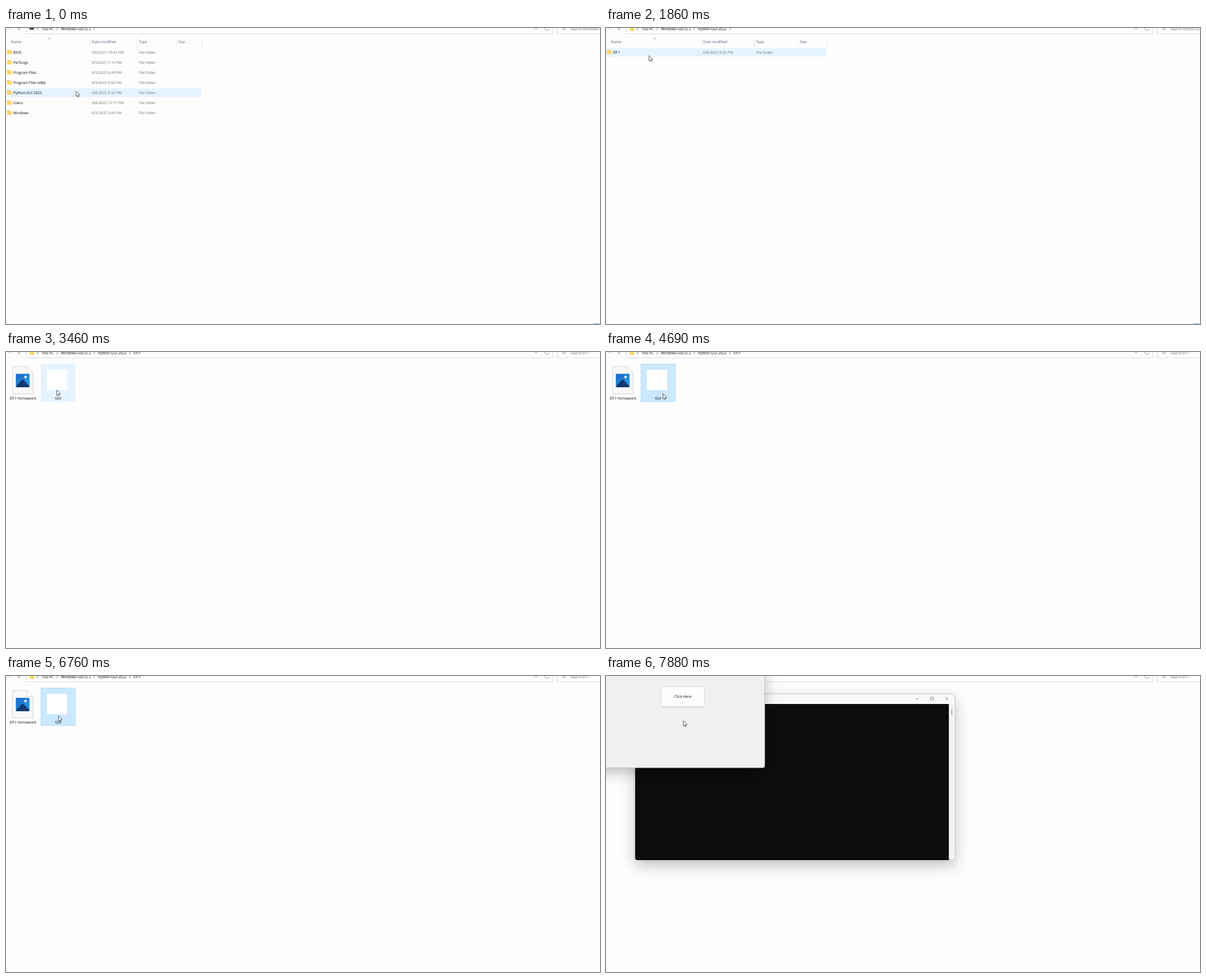
An HTML page with a canvas for the animation above (8 s loop, 1059 by 529 pixels).

```html
<!DOCTYPE html>
<html lang="en">
<head>
<meta charset="utf-8">
<title>Opening a GUI program</title>
<style>
html, body { margin: 0; width: 100%; height: 100%; overflow: hidden; background: #fdfdfd; }
canvas { display: block; }
</style>
</head>
<body>
<canvas id="stage" width="1059" height="529"></canvas>
<script>
const ctx = document.getElementById('stage').getContext('2d');
const LOOP = 8000, BEAT = 140;
const INK = '#000', GRAY = '#6e6e6e', HEAD = '#4a5c78', LINE = '#dcdcdc', PAPER = '#fdfdfd';
const HOVER = '#e5f3ff', SELECTED = '#cce8ff';
const SANS = '500 6.5px "Open Sans", sans-serif', MONO = '7.7px "Liberation Mono", monospace';

const OPEN_COURSE = 1000, OPEN_EPISODE = 2540, FILES_READY = 2820, SELECT_FILE = 4110, LAUNCH = 7220;

// Pointer moves: start, end, and the place it comes to rest.
const moves = [[0, 130, 125, 112], [1000, 2020, 74, 46], [2020, 2170, 73, 45], [2680, 3580, 92, 70],
  [3580, 3710, 100, 69], [4600, 4690, 101.5, 74.5], [4690, 5680, 116, 143], [5830, 6200, 135, 169],
  [6200, 6760, 93.5, 71.5], [7220, 7880, 138, 80]];

const mix = (a, b, p) => a + (b - a) * p;
const easeOut = p => 1 - (1 - p) ** 1.7;

// Progress of a span, held between screen refreshes.
function progress(time, start, end) {
  if (time >= end) return 1;
  return Math.max(0, Math.floor((time - start) / BEAT) * BEAT / (end - start));
}

function pointerAt(time) {
  let x = 125, y = 113;
  for (const [start, end, toX, toY] of moves) {
    const p = easeOut(progress(time, start, end));
    x = mix(x, toX, p);
    y = mix(y, toY, p);
  }
  return [x, y];
}

function rect(x, y, w, h, fill) {
  ctx.fillStyle = fill;
  ctx.fillRect(x, y, w, h);
}

function text(s, x, y, color = INK, align = 'left', font = SANS) {
  ctx.font = font;
  ctx.textAlign = align;
  ctx.fillStyle = color;
  ctx.fillText(s, x, y + 2.4);
  return x + ctx.measureText(s).width;
}

function icon(path, x, y, { fill, stroke, width = 0.8 }) {
  const shape = new Path2D(path);
  ctx.save();
  ctx.translate(x, y);
  if (fill) {
    ctx.fillStyle = fill;
    ctx.fill(shape);
  }
  if (stroke) {
    ctx.strokeStyle = stroke;
    ctx.lineWidth = width;
    ctx.stroke(shape);
  }
  ctx.restore();
}

function rounded(x, y, w, h, r, fill, border) {
  ctx.beginPath();
  ctx.roundRect(x, y, w, h, r);
  ctx.fillStyle = fill;
  ctx.fill();
  if (!border) return;
  ctx.strokeStyle = border;
  ctx.lineWidth = 0.8;
  ctx.stroke();
}

function folder(x, y) {
  rect(x, y, 4, 3, '#e9ad35');
  rect(x, y + 1.2, 8.5, 6.3, '#ffd667');
}

function addressBar(crumbs) {
  const gray = { stroke: GRAY };
  icon('M-2 0 0 2 2 0', 7, 0, { stroke: '#aaa' });
  icon('M0 4.5V-1.5M-2.5 1 0 -1.5 2.5 1', 23.5, 0, gray);
  icon('M36.5 -1V10.5H974.5V-1M982.5 -1V10.5H1060', 0, 0, { stroke: LINE, width: 1 });
  icon('M-2 0 0 2 2 0', 945, 0, gray);
  icon('M3.4 0A3.4 3.4 0 1 1 2 -2.7', 964.5, 1, gray);
  icon('M2.3 0A2.3 2.3 0 1 1 2.2 -.5M-1.6 1.7 -4.5 4.6', 995.5, 0, gray);
  text('Search ' + crumbs[crumbs.length - 1], 1006, 1.4, GRAY);

  if (crumbs.length > 2) folder(42, -2.5);
  else rect(42, 0, 8, 3, '#444');
  let x = 55;
  crumbs.forEach((crumb, i) => {
    icon('M0 -2.3 2.2 0 0 2.3', x, 1.3, { stroke: '#444' });
    x = text(crumb, x + 8, 1.4) + 5;
  });
  if (crumbs.length < 4) icon('M0 -2.3 2.2 0 0 2.3', x, 1.3, { stroke: '#444' });
}

function header(cols, end) {
  ['Name', 'Date modified', 'Type', 'Size'].forEach((s, i) => text(s, cols[i], 25, HEAD));
  [...cols.slice(1), end + 4].forEach(x => rect(x - 4, 17, 1, 15, '#e4e4e4'));
  icon('M-2.2 1 0 -1 2.2 1', cols[1] / 2 + 0.3, 18.8, { stroke: '#777' });
  rect(1047, 528, 12, 1, '#4db5e0');
}

function row(y, name, date, cols) {
  folder(2, y - 4.2);
  text(name, 13, y);
  text(date, cols[1], y, GRAY);
  text('File folder', cols[2], y, GRAY);
}

function drivePage(time) {
  const cols = [9, 153, 237, 307];
  addressBar(['This PC', 'Windows-SSD (C:)']);
  header(cols, 349);
  rect(0, 108, 348, 15.5, time < 690 ? HOVER : SELECTED);
  [['BIOS', '9/6/2021 10:42 PM'], ['PerfLogs', '6/5/2021 7:10 PM'], ['Program Files', '6/3/2022 6:49 PM'],
    ['Program Files (x86)', '6/3/2022 9:56 PM'], ['Python GUI 2022', '6/8/2022 9:32 PM'],
    ['Users', '6/8/2022 12:17 PM'], ['Windows', '6/3/2022 3:44 PM']
  ].forEach(([name, date], i) => row(43.5 + 18.05 * i, name, date, cols));
}

function coursePage(pointerY) {
  const cols = [9, 173, 267.5, 346];
  addressBar(['This PC', 'Windows-SSD (C:)', 'Python GUI 2022']);
  header(cols, 394);
  if (pointerY < 51) rect(0, 36, 393, 15, HOVER);
  row(43.5, 'EP.1', '6/8/2022 9:32 PM', cols);
}

function pictureFile() {
  icon('M0 0H26L37 11V49H0ZM26 0V11H37', 11.5, 26, { fill: '#f9f9f9', stroke: '#c8c8c8' });
  const sky = ctx.createLinearGradient(18, 39, 42, 63);
  sky.addColorStop(0, '#1766c8');
  sky.addColorStop(1, '#2ba4ec');
  rounded(17.5, 39, 24.5, 24, 1.5, sky);
  icon('M0 11 10 0Q11.5 -1 13 0L24 11 22.5 13H1Z', 18, 50, { fill: '#123a70' });
  rounded(32.5, 42.5, 4.6, 4.6, 2.3, '#e8f6ff');
  text('EP.1 Homework', 30.3, 82.5, INK, 'center');
}

function episodePage(time) {
  addressBar(['This PC', 'Windows-SSD (C:)', 'Python GUI 2022', 'EP.1']);
  if (time < FILES_READY) {
    header([9, 252, 389, 502], 574);
    text('Working on it...', 509, 45, GRAY);
    return;
  }
  pictureFile();
  if (time < SELECT_FILE) rect(62, 21, 62, 68, HOVER);
  else rounded(62.5, 21.5, 61, 67, 0, SELECTED, '#a4d6ff');
  rect(73, 32, 36, 36, '#fff');
  text('GUI', 93, 82.5, INK, 'center');
}

// Draws a window scaled about a point, with a soft shadow behind its frame.
function openWindow(cx, cy, scale, alpha, frame, fill, content) {
  ctx.save();
  ctx.translate(cx, cy);
  ctx.scale(scale, scale);
  ctx.translate(-cx, -cy);
  ctx.globalAlpha = alpha;
  ctx.save();
  ctx.shadowColor = 'rgba(0,0,0,.24)';
  ctx.shadowBlur = 24;
  ctx.shadowOffsetY = 9;
  rounded(...frame, 4, fill);
  ctx.restore();
  rounded(...frame, 4, fill, '#b8b8b8');
  content();
  ctx.restore();
}

function consoleWindow(p) {
  openWindow(336.8, 180.5, mix(0.991, 1, p), 1, [52, 32, 570, 297], '#f9f9f9', () => {
    rounded(52, 50, 559.5, 279, [0, 0, 0, 4], '#0c0c0c');
    rect(611.5, 50, 10, 275, '#f3f3f3');
    rect(616, 60, 1, 9.5, '#777');
    rect(57, 36.5, 8, 8, '#4b78a8');
    text('C:\\WINDOWS\\py.exe', 69, 40.7, '#888');
    icon('M0 3H6M26.5 0h5v5h-5ZM53 0l5 5m0 -5l-5 5', 552, 38, { stroke: GRAY });
    text('Welcome to this program!', 52, 55, '#ccc', 'left', MONO);
  });
}

function buttonWindow(p) {
  openWindow(98, 37, mix(0.945, 1, p), mix(0.68, 1, p), [-40, -60, 323, 224], p ? '#f0f0f0' : '#fafafa', () => {
    rounded(98.4, 19, 77.2, 36, 2, PAPER, '#d2d2d2');
    rect(100, 55, 74, 0.8, '#bbb');
    text('Click Here', 137, 37, INK, 'center');
  });
}

function draw() {
  const time = performance.now() % LOOP, [x, y] = pointerAt(time);
  ctx.textRendering = 'geometricPrecision';
  rect(0, 0, 1059, 529, PAPER);
  if (time < OPEN_COURSE) drivePage(time);
  else if (time < OPEN_EPISODE) coursePage(y);
  else episodePage(time);
  if (time >= LAUNCH) {
    const p = easeOut(progress(time, LAUNCH, LAUNCH + 2 * BEAT));
    const windows = [consoleWindow, buttonWindow];
    if (!p) windows.reverse();
    windows.forEach(show => show(p));
  }
  icon('M0 0V9.4L2.2 7.5 3.7 10.6 5 10 3.6 6.9 6.6 6.7Z', x, y, { fill: '#fff', stroke: '#111', width: 0.7 });
  requestAnimationFrame(draw);
}
draw();
</script>
</body>
</html>
```
